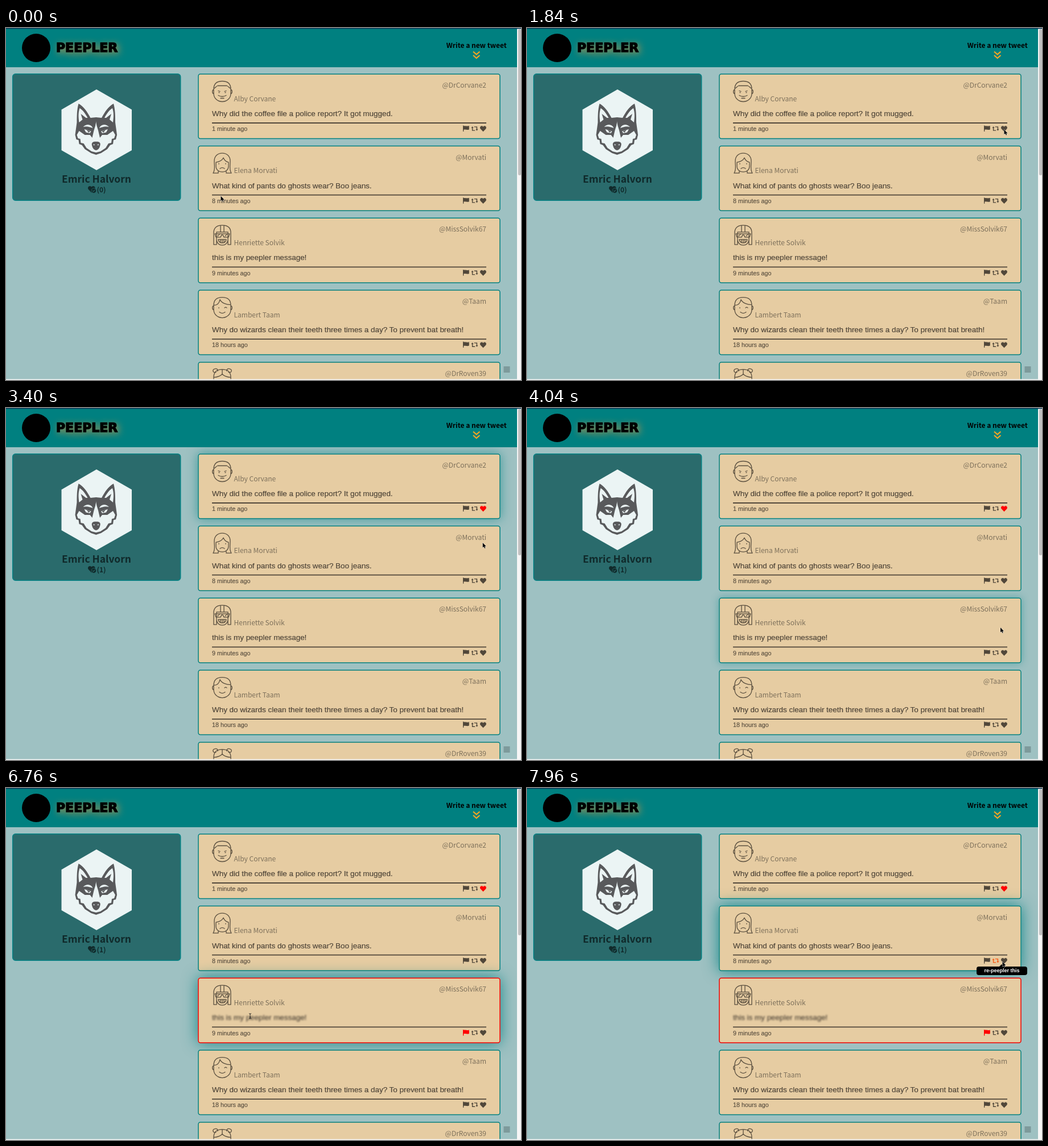
An HTML page for the animation above (8 s loop, 905 by 619 pixels).

```html
<!DOCTYPE html>
<html lang="en">
<head>
<meta charset="utf-8">
<style>
  html, body { margin: 0; width: 100%; height: 100%; overflow: hidden; background: #9ec1c2; }
  svg { position: absolute; left: 0; top: 0; overflow: visible; }
  #stage { position: absolute; left: 0; top: 0; width: 905px; height: 619px; overflow: hidden; }
  .card { position: absolute; left: 337px; top: 80px; width: 532px; height: 115px; border-radius: 4px; }
  .frame { fill: #e6cca2; stroke: #008080; stroke-width: 1.5; }
  .slim, .firm { font-family: "Noto Sans CJK SC", "Noto Sans CJK JP", "Noto Sans CJK", "Open Sans", sans-serif; font-size: 12px; }
  .slim { font-weight: 300; fill: #7d705b; }
  .firm { font-weight: 600; }
  .msg, .age { font-family: "Liberation Sans", Arial, sans-serif; fill: #51473a; }
  .msg { font-size: 13.43px; stroke: #51473a; stroke-width: .2px; }
  .age { font-size: 10.75px; stroke: #51473a; stroke-width: .1px; }
  .face { fill: none; stroke: #5a4f3f; stroke-width: 1.3; stroke-linecap: round; stroke-linejoin: round; }
  header { position: absolute; left: 0; top: 0; width: 898px; height: 68.5px; background: #008080; }
  h1 { position: absolute; left: 88px; top: 21.5px; margin: 0; font: bold 22px/26px "DejaVu Sans", sans-serif;
    color: #000; -webkit-text-stroke: 1.4px #000; text-shadow: 3px 3px 13px #f0983c; }
  #tip { position: absolute; width: 89px; height: 15px; border-radius: 4px; background: #000; color: #fff;
    font: bold 9px/15px "Liberation Sans", Arial, sans-serif; text-align: center; }
  #tip::before { content: ""; position: absolute; left: 40px; top: -4.5px;
    border: 4.5px solid transparent; border-top: 0; border-bottom-color: #000; }
</style>
</head>
<body>
<div id="stage">
  <svg width="905" height="619">
    <rect x="11.7" y="80.7" width="295" height="222.6" rx="5" fill="#2a6b6c" stroke="#068486" stroke-width="1.5"/>
    <path fill="#ebf4f4" d="M159 108l62 35.5V215l-62 35-61.5-35v-71.5z"/>
    <defs>
      <g id="half">
        <path fill="#58595b" d="M0 157-10 158C-16 147-22 138-31 133-34 143-34 156-34 166L-37 188-35 196-31 197-30 204-25 206-20 213-9 220 0 223z"/>
        <path fill="#ebf4f4" d="M-29 141C-32 150-31 158-30 166L-24 161-27 151-18 158-15 158C-20 149-24 144-29 141z"/>
        <path fill="#ebf4f4" d="M0 164-1.500 172-4 180-7 193-11 188-20 188-30 181-34 188-32 194-28 195-27 202-22 203-17 211-8 217 0 219z"/>
        <path fill="#ebf4f4" d="M-6 176C-9 169-17 168-23 174-17 172-11 174-6 176z"/>
        <path fill="#ebf4f4" d="M-21 178-9 181.500-11 185-18 183.500z"/>
        <path fill="#58595b" d="M-17 179.300-10.500 181.500-13 184z"/>
        <path fill="#58595b" d="M0 200C-7 199-9 203-7 208-6 212-3 215 0 215z"/>
        <path fill="#ebf4f4" d="M-5 204l3 1.500-2.500 1z"/>
      </g>
      <path id="heart" d="M5.500 10 .9 5.300C-1 3 .5 0 3 0 4.200 0 5 .7 5.500 1.500 6 .7 6.800 0 8 0c2.500 0 4 3 2.100 5.300z"/>
      <path id="flag" d="M0 0h1.300v10.500H0zM1.300 1C4 0 6 2 10.800.6V7C7 8.500 5 6.300 1.300 7.400z"/>
      <path id="share" d="M1.400 3H2.800V7H6L7.300 8.300H1.400zM0 3.300 2.100.5 4.200 3.300zM4.700.7H10.600V5.500H9.200V2H6zM7.800 5.300H12L9.900 8.200z"/>
    </defs>
    <use href="#half" x="158.5"/>
    <use href="#half" transform="translate(158 0) scale(-1 1)"/>
    <g class="firm" fill="#10292a">
      <text x="159" y="272" text-anchor="middle" style="font-size:17.4px">Emric Halvorn</text>
      <use href="#heart" transform="translate(144 278) scale(1.15)"/>
      <circle cx="154.300" cy="286" r="4.300" stroke="#2a6b6c" stroke-width=".8"/>
      <path d="M152.300 286l1.500 1.500 2.700-3" fill="none" stroke="#2a6b6c" stroke-width="1.100"/>
      <text id="count" x="159.500" y="288.500"></text>
    </g>
  </svg>
  <div id="cards"></div>
  <header>
    <svg width="898" height="68">
      <circle cx="53" cy="35" r="25"/>
      <text class="firm" x="826.800" y="35" text-anchor="middle">Write a new tweet</text>
      <path d="M821 41.500l5.700 5 5.700-5M821 48l5.700 5 5.700-5" fill="none" stroke="#f7a521" stroke-width="2.200"/>
    </svg>
    <h1>PEEPLER</h1>
  </header>
  <svg width="905" height="619">
    <rect x="874.500" y="595" width="11" height="11" fill="#7d9a9b"/>
    <path fill="#f5f5f5" d="M898 0h7v619h-7zM0 617.500h905v1.500H0z"/>
    <rect x="900" y="2" width="5" height="257" rx="2.500" fill="#c1c1c1"/>
    <path fill="#0c3a58" d="M0 0h905v1.500H0z"/>
  </svg>
  <div id="tip"></div>
  <svg width="905" height="619">
    <g id="pointer">
      <path id="arrow" d="M0 0V8.600L2 6.800 3.300 9.800 4.700 9.200 3.400 6.400H6z" stroke="#fff" stroke-width=".7" paint-order="stroke"/>
      <path id="beam" d="M-2-4.500Q0-4.500 0-3 0-4.500 2-4.500M0-3V3M-2 4.500Q0 4.500 0 3 0 4.500 2 4.500M-1 1.500H1" fill="none" stroke="#222" stroke-width=".9"/>
    </g>
  </svg>
</div>
<script>
const INK = '#51473a', HOVER = '#fa5a14', RED = '#f00', LOOP = 8000, PITCH = 126.7;
const $ = id => document.getElementById(id);

const head = 'M2 15C2 5 8 1 17 1s15 4 15 14v8c0 8-7 14-15 14S2 31 2 23z';
const ears = 'M2 16c-3 0-3 7 0 7M32 16c3 0 3 7 0 7';
const eyes = 'M11 19v1M23 19v1';
const faces = [
  head + ears + 'M2 14C5 13 6 10 9 9H25C28 10 29 13 32 14M10 18l3 1M24 18l-3 1M11 21h1M22 21h1M10 26Q17 30 24 26M14 31h6',
  'M1 36C5 30 3 24 3 15 3 6 9 1 17 1s14 5 14 14c0 9-2 15 2 21H24V33M1 36H10V33' + eyes +
    'M6 17C12 16 17 13 19 9c2 5 5 7 9 8v7c0 6-5 10-11 10S6 30 6 24zM13 28Q17 25 21 28',
  'M2 35V14C2 5 8 1 17 1s15 4 15 13V35H27V13H7V35zM14 2V12M20 2V12M7 27c1 6 5 9 10 9s9-3 10-9' +
    'M4 16H30L28 22H20L18 18H16L14 22H6zM9 20l3-3M22 20l3-3M10 26H24Q23 32 17 32T10 26M14 26v5M17 26v6M20 26v5',
  head + ears + 'M2 15C9 15 12 10 13 5 16 11 24 14 32 14M11 19v1M21 19.500q2-2 4 0M12 27q5 4 10 0',
  head + 'M6 6C0 8-1 1 4 0 8-1 10 2 9 4M28 6c6 2 7-5 2-6-4-1-6 2-5 4M17 1V9M2 15C9 15 15 12 17 9 19 12 25 15 32 15' + eyes
];
const posts = [
  ['Alby Corvane', '@DrCorvane2', 'Why did the coffee file a police report? It got mugged.', '1 minute ago'],
  ['Elena Morvati', '@Morvati', 'What kind of pants do ghosts wear? Boo jeans.', '8 minutes ago'],
  ['Henriette Solvik', '@MissSolvik67', 'this is my peepler message!', '9 minutes ago'],
  ['Lambert Taam', '@Taam', 'Why do wizards clean their teeth three times a day? To prevent bat breath!', '18 hours ago'],
  ['', '@DrRoven39', '', '']
];

$('cards').innerHTML = posts.map(([name, handle, msg, age], i) => `
  <div class="card" style="transform:translateY(${PITCH * i}px)"><svg width="532" height="115">
    <rect class="frame" x="1" y=".9" width="530" height="113.6" rx="3.5"/>
    <path class="face" transform="translate(26 12.500)" d="${faces[i]}"/>
    <text class="slim" x="63.500" y="48.500">${name}</text>
    <text class="slim" x="507" y="25" text-anchor="end">${handle}</text>
    <text class="msg" x="25" y="75">${msg}</text>
    <path fill="${INK}" d="M25 86.100h482v1.800H25z"/>
    <text class="age" x="25" y="101.300">${age}</text>
    <g fill="${INK}">
      <use href="#flag" x="466" y="91.500"/><use href="#share" x="480.500" y="92.500"/><use href="#heart" x="496" y="92.300"/>
    </g>
  </svg></div>`).join('');

const cards = [...document.querySelectorAll('.card')];
const icon = (card, kind) => cards[card].querySelector(`use[href="#${kind}"]`);
const flag = icon(2, 'flag'), share = icon(1, 'share'), heart = icon(0, 'heart');
const frame = cards[2].querySelector('.frame'), blurred = cards[2].querySelector('.msg');

// [from, to, label, centre x, card]
const tips = [
  [1000, 1800, 'like this', 849.5, 0],
  [5120, 5600, 'file a complaint', 819.5, 2],
  [7640, LOOP, 're-peepler this', 834.5, 1]
];
// [time, x, y] of the pointer
const path = [
  [0, 377.5, 295.5], [840, 846, 187], [1200, 838, 178.5], [1720, 838, 178.5], [2320, 843, 181],
  [2560, 843, 181], [2680, 840, 178], [3120, 840, 178], [3920, 832, 386], [4520, 832, 386],
  [5280, 806, 429], [5520, 806, 429], [5640, 800, 432], [6160, 800, 432], [6720, 429, 401],
  [6780, 429, 401], [6960, 500, 311], [7120, 500, 311], [7800, 837, 305], [7920, 837, 305], [7960, 835.5, 305.5]
];

const between = (t, a, b) => t >= a && t < b;
function ramp(t, a, b) {
  const u = Math.min(1, Math.max(0, (t - a) / (b - a)));
  return u * u * (3 - 2 * u);
}
function pointerAt(t) {
  const i = path.findIndex(p => p[0] > t);
  if (i < 0) return path[path.length - 1].slice(1);
  const [a, x, y] = path[i - 1], [b, x2, y2] = path[i], k = ramp(t, a, b);
  return [x + (x2 - x) * k, y + (y2 - y) * k];
}
function glow(card, k) {
  cards[card].style.boxShadow = `0 0 ${27 * k}px rgba(0,128,128,${.85 * k})`;
}

function draw(now) {
  const t = now % LOOP;
  glow(0, ramp(t, 1720, 2360) - ramp(t, 3120, 3920));
  glow(1, ramp(t, 7200, 7800));
  glow(2, ramp(t, 3840, 4240) - ramp(t, 7120, 7600));

  const tip = tips.find(([a, b]) => between(t, a, b));
  $('tip').style.display = tip ? '' : 'none';
  if (tip) {
    $('tip').textContent = tip[2];
    $('tip').style.left = tip[3] - 44.5 + 'px';
    $('tip').style.top = 187.3 + PITCH * tip[4] + 'px';
  }

  const liked = t >= 2600, flagged = t >= 5440;
  heart.style.fill = liked ? RED : tip === tips[0] ? HOVER : INK;
  flag.style.fill = tip === tips[1] ? HOVER : flagged ? RED : INK;
  share.style.fill = tip === tips[2] ? HOVER : INK;
  $('count').textContent = `(${+liked})`;
  frame.style.stroke = flagged ? '#f00000' : '';
  blurred.style.filter = flagged ? 'blur(1.6px)' : '';

  const beam = between(t, 6680, 6840), [x, y] = pointerAt(t);
  $('pointer').setAttribute('transform', `translate(${x} ${y})`);
  $('arrow').style.display = beam ? 'none' : '';
  $('beam').style.display = beam ? '' : 'none';
  requestAnimationFrame(draw);
}
draw(performance.now());
</script>
</body>
</html>
```
